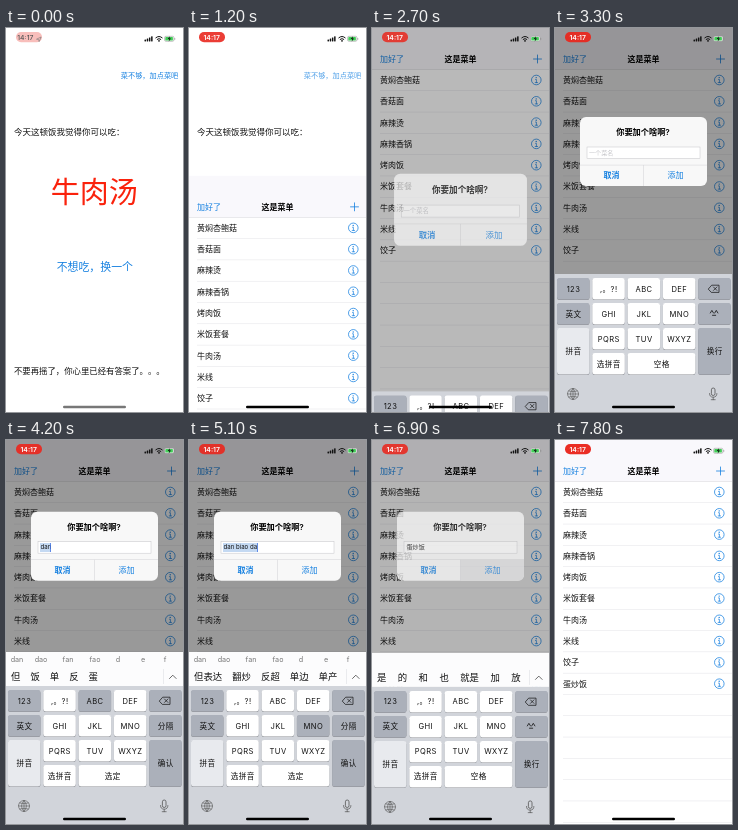
An HTML page that plays this animation: 177x384 px, repeating every 8000 ms.

```html
<!DOCTYPE html>
<html lang="zh-CN">
<head>
<meta charset="utf-8">
<style>
html, body { margin: 0; width: 100%; height: 100%; overflow: hidden; background: #fff; }
svg { display: block; width: 177px; height: 384px; font-family: Inter, "Noto Sans CJK SC", sans-serif; text-spacing-trim: space-all; }
</style>
</head>
<body>
<svg id="stage" viewBox="0 0 177 384"></svg>
<script>
const LOOP = 8000, BLUE = '#1680e0', GREY = '#abb0ba';
const DISHES = ['黄焖杏鲍菇', '香菇面', '麻辣烫', '麻辣香锅', '烤肉饭', '米饭套餐', '牛肉汤', '米线', '饺子'];
const KEY_START = 3700, KEY_STEP = 154, COMMIT = 5800, ADD = 6880;
const PRESSES = ['DEF', 'ABC', 'MNO', 'ABC', 'GHI', 'ABC', 'MNO', 'DEF', 'ABC', 'MNO'];
const TYPED = ['', 'd', 'da', 'dan', 'dan b', 'dan bi', 'dan bia', 'dan biao', 'dan biao d', 'dan biao da', 'dan chao fan'];
const WORDS = ['', '的 饿 等 放 点', '大 发 打 法 达', '但 饭 单 反 蛋', '单笔 反编 大哥 单', '单比 反比 翻唱 单',
  '单边 反差 翻车 单', '翻炒 反超 单边 单产', '翻炒 反超 单边 单产', '但表达 翻炒 反超 单边 单产', '蛋炒饭 但表达 翻炒 反超'];

const stage = document.getElementById('stage');
const clamp = v => Math.max(0, Math.min(1, v));
const ease = (t, start, length) => { const p = clamp((t - start) / length); return 1 - (1 - p) ** 3; };
const during = (t, start, end) => t >= start && t < end;
const spring = s => s <= 0 ? 0 : 1 - (1 + 13.5 * s) * Math.exp(-13.5 * s);

// y is the vertical middle of the glyphs
const text = (x, y, s, size = 8, fill = '#111', anchor = 'start', extra = '') =>
  `<text x="${x}" y="${y + size * .37}" font-size="${size}" fill="${fill}" text-anchor="${anchor}" ${extra}>${s}</text>`;
const mid = (x, y, s, size, fill, extra) => text(x, y, s, size, fill, 'middle', extra);
const rect = (x, y, w, h, fill, r = 0, extra = '') =>
  `<rect x="${x}" y="${y}" width="${w}" height="${h}" rx="${r}" fill="${fill}" ${extra}/>`;
const line = (d, stroke = '#111', width = .8) =>
  `<path d="${d}" fill="none" stroke="${stroke}" stroke-width="${width}" stroke-linecap="round" stroke-linejoin="round"/>`;
const group = (body, extra) => `<g ${extra}>${body}</g>`;
const shift = (body, y) => group(body, `transform="translate(0 ${y})"`);

function page(t) {
  const fade = on => `opacity="${on}"`;
  return text(172.3, 47.5, '菜不够，加点菜吧', 7.2, BLUE, 'end', fade(t > 980 ? .75 : 1))
    + text(8, 104.2, '今天这顿饭我觉得你可以吃：', 8.5)
    + mid(88.2, 163.8, t < 400 ? '牛肉汤' : '米线', 29, '#fa220c')
    + mid(88.8, 239, '不想吃，换一个', 10.9, BLUE, fade(during(t, 200, 400) ? .3 : 1))
    + text(8, 343.3, '不要再摇了，你心里已经有答案了。。。', 8.4);
}

function menu(t) {
  let s = rect(0, 0, 177, 384, '#fff') + rect(0, 0, 177, 41.5, '#f9f8fc') + rect(0, 41.3, 177, .5, '#d4d4d8')
    + text(8, 31, '加好了', 8, BLUE) + mid(88.5, 31, '这是菜单', 8, '#000', 'font-weight="600"')
    + line('M161.5 31h8M165.5 27v8', BLUE);
  const rows = t > ADD ? [...DISHES, '蛋炒饭'] : DISHES;
  for (let i = 0; i < 16; i++) {
    const y = 52 + i * 21.3;
    s += rect(8, y + 10.5, 169, .5, '#e2e2e6');
    if (rows[i]) s += text(8, y, rows[i]) + `<circle cx="164.3" cy="${y}" r="4.8" fill="none" stroke="${BLUE}" stroke-width=".75"/>`
      + `<circle cx="164.2" cy="${y - 2.4}" r=".7" fill="${BLUE}"/>` + line(`M163.5 ${y - .6}h.9v3.2m-1.2 0h2.4`, BLUE, .7);
  }
  return s;
}

function alertBox(t, count, composing) {
  const value = t >= COMMIT ? '蛋炒饭' : TYPED[count];
  const width = value.length * 3 + 1;
  let s = rect(25, 0, 127, 69, '#f8f8f8', 6)
    + mid(88, 15, '你要加个啥啊?', 8.2, '#000', 'font-weight="600"')
    + rect(32, 30, 113, 11.5, '#fff', 0, 'stroke="#c4c4c8" stroke-width=".5"');
  if (composing) s += rect(34, 31.3, width, 9, '#c4d9f2');
  s += value ? text(34.5, 35.5, value, 6.1) : text(34, 35.5, '一个菜名', 6.1, '#c4c4c8');
  if (composing) s += rect(34 + width, 31.3, .8, 9, '#3a6fe0');
  if (during(t, ADD - 110, ADD + 200)) s += '<path d="M88.5 48H152V63a6 6 0 0 1-6 6H88.5z" fill="#e2e2e4"/>';
  return s + rect(25, 47.8, 127, .5, '#d0d0d4') + rect(88.3, 48, .5, 21, '#d0d0d4')
    + mid(56.5, 58.2, '取消', 8, BLUE, 'font-weight="600"') + mid(120.5, 58.2, '添加', 8, BLUE);
}

function key(col, row, label, fill = '#fff', cols = 1, rows = 1) {
  const x = 2 + col * 35.3, y = 250 + row * 25, w = cols * 35.3 - 2.8, h = rows * 25 - 3.5;
  return rect(x, y + .6, w, h, '#898c92', 2.4) + rect(x, y, w, h, fill, 2.4)
    + mid(x + w / 2 + .2, y + h / 2, label, 7.6, '#111', 'letter-spacing=".4"');
}

function candidates(count, composing) {
  let s = rect(0, 212, 177, 34, '#fcfcfd') + line('M163.5 238.5l3.3-3.3 3.3 3.3', '#444') + rect(157, 229, .4, 15, '#d0d2d6');
  if (composing) {
    const xs = [11, 35, 62, 89, 112, 137, 159];
    ['dan', 'dao', 'fan', 'fao', 'd', 'e', 'f'].forEach((p, i) => s += mid(xs[i], 219.5, p, 7.2, '#777'));
  }
  let x = 5;
  const words = composing ? WORDS[count] : '是 的 和 也 就是 加 放';
  for (const word of words.split(' ')) {
    s += text(x, 236.8, word, 9.4);
    x += word.length * 9.4 + (composing ? 10 : 11.4);
  }
  return s;
}

function keyboard(t, pressed, count, composing) {
  let s = rect(0, 246, 177, 138, '#d1d4da');
  if (t >= KEY_START + 60) s += candidates(count, composing);
  [',。?!', 'ABC', 'DEF', 'GHI', 'JKL', 'MNO', 'PQRS', 'TUV', 'WXYZ'].forEach((label, i) =>
    s += key(1 + i % 3, Math.floor(i / 3), label, label === pressed ? GREY : '#fff'));
  s += key(0, 0, '123', GREY) + key(0, 1, '英文', GREY) + key(0, 2, '拼音', '#e8eaee', 1, 2)
    + key(1, 3, '选拼音') + key(2, 3, composing ? '选定' : '空格', '#fff', 2)
    + key(4, 0, '', GREY) + key(4, 1, composing ? '分隔' : '', GREY) + key(4, 2, composing ? '确认' : '换行', GREY, 1, 2);
  if (!composing) s += line('M155.3 285l1.6-2.6 1.6 2.6m1.2 0l1.6-2.6 1.6 2.6M157.5 287.3h3.2');
  s += line('M153.5 260.8l3.2-3.6h7.3v7.2h-7.3zM158.5 259l3.4 3.4m0-3.4l-3.4 3.4', '#111', .7);
  s += line('M12.5 366a5.5 5.5 0 1 0 11 0a5.5 5.5 0 1 0-11 0h11M18 360.5v11q-5-5.5 0-11q5 5.5 0 11M13.7 363q4.3 1.5 8.6 0M13.7 369q4.3-1.5 8.6 0', '#555', .6);
  return s + rect(156.4, 360, 3.6, 7.5, 'none', 1.8, 'stroke="#555" stroke-width=".8"')
    + line('M154.5 365.5a3.7 3.7 0 0 0 7.4 0M158.2 369.3v2.4m-2 0h4', '#555', .7);
}

function statusBar(t) {
  const appear = clamp(t / 350);
  const glow = .93 + .07 * Math.cos((t - 7550) / 1917 * 2 * Math.PI);
  const plain = text(11.3, 9.5, '14:17', 6.8, '#555', 'start', 'font-weight="500"')
    + '<path d="M30.5 11.2l4.6-2.2-2 4.7-.5-2.2z" fill="none" stroke="#777" stroke-width=".6"/>';
  let s = rect(10, 4, 26, 10.3, '#e9281f', 5, `opacity="${.3 + (glow - .3) * appear}"`)
    + group(plain, `opacity="${1 - appear}"`)
    + text(14.5, 9.2, '14:17', 6.8, '#fff', 'start', `font-weight="600" opacity="${appear}"`);
  for (let i = 0; i < 4; i++) s += rect(138.5 + i * 2.2, 11.6 - i * 1.1, 1.5, 1.9 + i * 1.1, '#111', .4);
  s += line('M149.8 9.8q3.2-2.8 6.4 0M151.2 11.3q1.8-1.5 3.6 0', '#111', 1) + '<circle cx="153" cy="12.9" r=".8"/>';
  return s + rect(158.6, 8.3, 9.3, 5, '#fff', 1.3, 'stroke="#888" stroke-width=".5"')
    + rect(159.3, 9, 7.6, 3.6, '#42cc58', .7) + rect(168.5, 9.9, .7, 1.9, '#888', .3)
    + '<path d="M164 8.3l-2.3 2.8h1.5l-.5 2.3 2.3-2.9h-1.5z" fill="#111"/>';
}

function draw(t) {
  const press = (t - KEY_START) / KEY_STEP;
  const pressed = press >= 0 && press % 1 < .6 ? PRESSES[Math.floor(press)] : '';
  const count = Math.max(0, Math.min(10, Math.floor(press + .6)));
  const composing = count > 0 && t < COMMIT;
  const closing = ease(t, ADD, 220);
  const shown = ease(t, 2620, 250) * (1 - closing);
  const raised = ease(t, 2680, 400), lowered = clamp((t - ADD) / 290) ** 2;
  const alertY = 157.5 - 68.5 * raised - 17.3 * ease(t, KEY_START + 60, 250);
  const scale = 1.15 - .15 * ease(t, 2620, 250);

  let s = rect(0, 0, 177, 384, '#fff') + page(t);
  if (t > 1047) s += shift(menu(t), 384 * (1 - spring((t - 1047) / 1000)));
  if (shown > 0) {
    s += rect(0, 0, 177, 384, '#000', 0, `opacity="${.4 * shown}"`);
    s += group(alertBox(t, count, composing),
      `opacity="${shown}" transform="translate(88.5 ${alertY + 34.5}) scale(${scale}) translate(-88.5 -34.5)"`);
  }
  if (raised > 0 && lowered < 1)
    s += shift(keyboard(t, pressed, count, composing), 138 * (1 - raised) + 175 * lowered);
  stage.innerHTML = s + rect(57, 377.8, 63, 2.4, t < 1047 ? '#777' : '#000', 1.2) + statusBar(t);
}

const begin = performance.now();
function frame() {
  draw((performance.now() - begin) % LOOP);
  requestAnimationFrame(frame);
}
frame();
</script>
</body>
</html>
```
